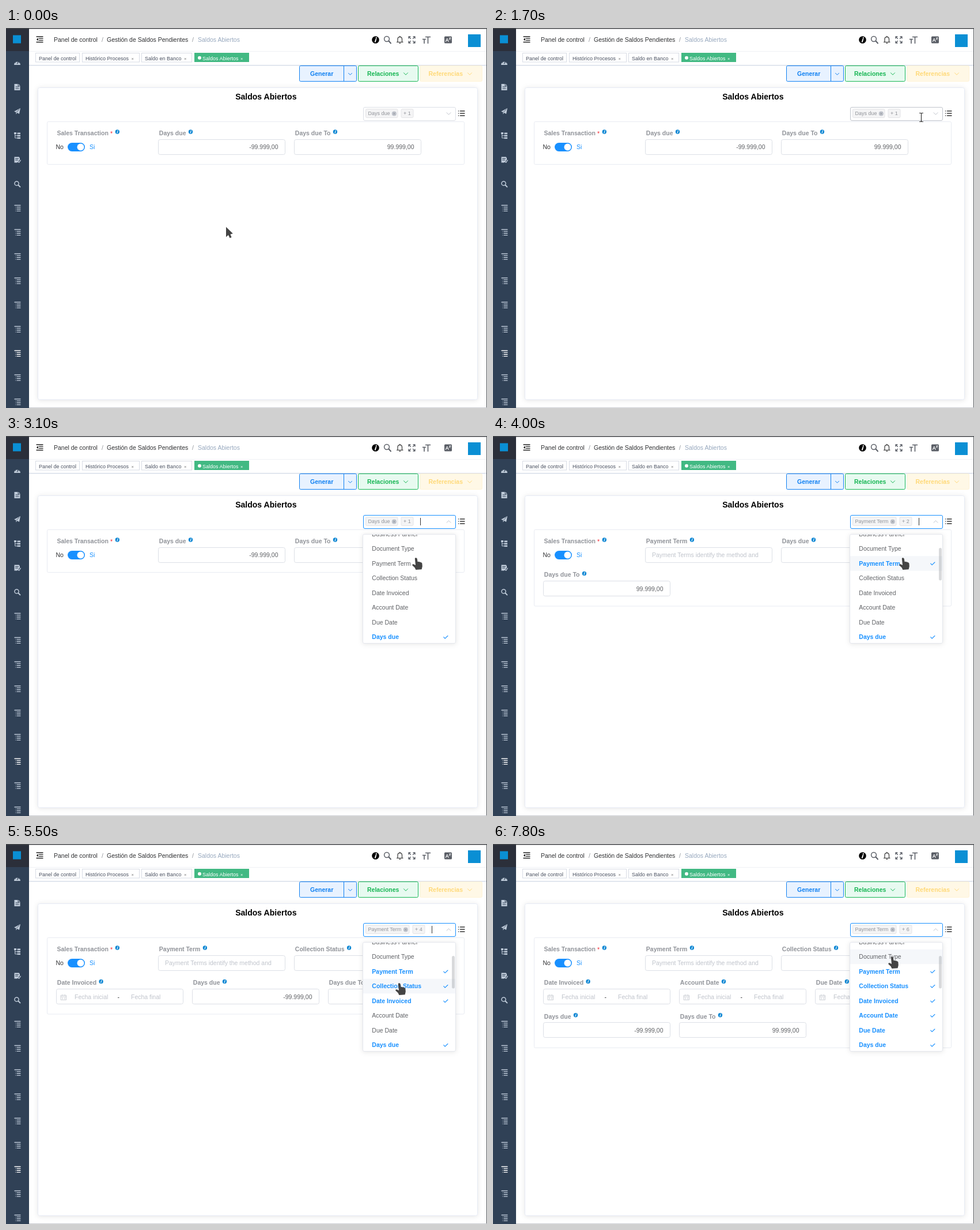
An HTML page for the animation above (8 s loop, 835 by 659 pixels).

```html
<!DOCTYPE html>
<html lang="es">
<head>
<meta charset="utf-8">
<title>Saldos Abiertos</title>
<style>
  html, body { margin: 0; width: 100%; height: 100%; overflow: hidden; background: #fff; }
  svg { display: block; width: 835px; height: 659px; font: 10.5px "Liberation Sans", Arial, sans-serif; }
  .b { font-weight: 700; }
  .s { font-size: 9px; }
  .line { fill: none; stroke-linecap: round; stroke-linejoin: round; }
  .card { filter: drop-shadow(0 1.5px 4px rgba(0,0,0,.1)); }
</style>
</head>
<body>
<svg viewBox="0 0 835 659">
  <defs>
    <clipPath id="list"><rect x="620" y="171" width="160" height="188.5"/></clipPath>
  </defs>
  <g id="page"></g>
  <g id="live"></g>
</svg>
<script>
const LOOP = 8000, STEP = 100;
const BLUE = '#1890ff', GREY = '#909399', PALE = '#c0c4cc', TEXT = '#606266', EDGE = '#dcdfe6';

const rect = (x, y, w, h, fill, stroke = 'none', r = 0, extra = '') =>
  `<rect x="${x}" y="${y}" width="${w}" height="${h}" fill="${fill}" stroke="${stroke}" rx="${r}" ${extra}/>`;
const text = (x, y, str, fill, cls = '', extra = '') =>
  `<text x="${x}" y="${y}" fill="${fill}" class="${cls}" ${extra}>${str}</text>`;
const line = (d, stroke, w = 1) => `<path class="line" d="${d}" stroke="${stroke}" stroke-width="${w}"/>`;
const shape = (d, fill, extra = '') => `<path d="${d}" fill="${fill}" ${extra}/>`;
const dot = (x, y, r, fill) => `<circle cx="${x}" cy="${y}" r="${r}" fill="${fill}"/>`;
const at = (x, y, body) => `<g transform="translate(${x} ${y})">${body}</g>`;
const chevron = (x, y, color, dir = 1, w = 3.5) =>
  line(`M${x - w} ${y - dir * w / 2}L${x} ${y + dir * w / 2}L${x + w} ${y - dir * w / 2}`, color);
const info = (x, y, r = 3.7, fill = '#1088d4') => dot(x, y, r, fill) +
  at(x, y, `<g transform="scale(${r / 6})">${line('M.8 -1L-.6 3.2', '#fff', 1.8)}${dot(1.2, -3.2, 1.1, '#fff')}</g>`);

const pen = document.createElement('canvas').getContext('2d');
function measure(str, font) {
  pen.font = `${font} "Liberation Sans", Arial, sans-serif`;
  return pen.measureText(str).width;
}

/* ---------- fixed page ---------- */

function sidebar() {
  const c = '#bfcbd9';
  const tree = color => line('M-5 -5H5M-1 -1.8H5M-1 1.5H5M-1 4.8H5', color, 1.3) +
    line('M-3.3 -1.8h.1M-3.3 1.5h.1M-3.3 4.8h.1', color, 1);
  const icons = [
    shape('M-5.5 3.5A5.5 5.5 0 1 1 5.5 3.5Z', c) + line('M0 1.5L1.5 -2M-3 0h.1M3 0h.1M-2 -2.5h.1', '#304156', 1.2),
    shape('M-5 -5.5H2L5 -2.5V5.5H-5Z', c) + line('M-2.5 -.5H2.5M-2.5 2.5H2.5M1.5 -5V-2H4.5', '#304156'),
    shape('M5.5 -5.5L3.5 4.5L-.2 2.5L-2 5.2L-2.2 1.4L-5.5 .2Z', c) + line('M-1.5 1.8L3.5 -3.5', '#304156', .8),
    rect(-5.5, -5.5, 4, 3, c) + rect(0, -5, 5.5, 2.6, c) + rect(0, -1, 5.5, 2.6, c) + rect(0, 3, 5.5, 2.6, c) +
      line('M-3.8 -3V4.3H0M-3.8 .3H0', c),
    shape('M-5 -5H3L4.5 -3V0L0 5H-5Z', c) + line('M-3 -2H2M-3 .5H1', '#304156') + line('M1.5 3L3 4.8L5.8 .8', c, 1.3),
    `<circle cx="-1" cy="-1" r="3.6" fill="none" stroke="${c}" stroke-width="1.5"/>` + line('M2 2L5 5', c, 1.8)
  ];
  let out = rect(0, 0, 40, 659, '#304156') + rect(0, 0, 40, 40, '#2b2f3a') + rect(12, 12.5, 14, 14, '#0a8fd4');
  for (let i = 0; i < 15; i++)
    out += at(19.5, 60.5 + 42 * i, icons[i] || at(.5, 0, tree(i === 12 ? '#fff' : c)));
  return out;
}

function navbar() {
  const k = '#5a5e66';
  const corner = (sx, sy) => line(`M${2 * sx} ${2 * sy}L${5 * sx} ${5 * sy}M${2.5 * sx} ${5.5 * sy}H${5.5 * sx}V${2.5 * sy}`, k, 1.3);
  return line('M53 15H64M57.5 18.2H64M57.5 21.4H64M53 24.5H64', '#222', 1.3) + shape('M56 17.2V22.3L52.8 19.8Z', '#222') +
    text(83, 24, 'Panel de control', '#303133') + text(166, 24, '/', GREY) +
    text(175, 24, 'Gestión de Saldos Pendientes', '#303133') + text(323, 24, '/', GREY) +
    text(333, 24, 'Saldos Abiertos', '#97a8be') +
    info(641.5, 20.5, 6.3, '#000') +
    `<circle cx="661" cy="19" r="4.4" fill="none" stroke="${k}" stroke-width="1.5"/>` + line('M664.5 22.5L668 26.5', k, 1.9) +
    line('M678.5 24.5H689M680 24V19.5Q680 15.5 683.8 15.3Q687.5 15.5 687.5 19.5V24M683.8 15V14M682.8 26.3H684.8', '#333', 1.2) +
    at(704.5, 20.5, corner(1, 1) + corner(1, -1) + corner(-1, 1) + corner(-1, -1)) +
    line('M728.5 15.5H736.5M732.5 15.5V26.5M723.5 19.5H728.5M726 19.5V26.5', k, 1.6) +
    rect(761, 14.5, 13, 12, k, 'none', 1.5) + text(762.5, 24, 'A', '#fff', 'b', 'font-size="9"') +
    line('M769.5 17.5H772.5M771 16.5V18L769.5 20.5M770 19L772 20.5', '#fff', .8) +
    rect(802, 11, 22, 22, '#0a8fd4') +
    rect(40, 40, 795, 1, '#eef0f4') + rect(40, 64, 795, 1.4, '#d5dbe8');
}

function tabs() {
  const tab = (x, w, name, close) => rect(x + .5, 43.5, w - 1, 15.5, '#fff', '#d8dce5') +
    text(x + 6, 55.5, name, '#495060', 's') + (close ? text(close, 56, '×', '#777', '', 'font-size="7.5"') : '');
  return tab(51, 77, 'Panel de control') + tab(132, 100, 'Histórico Procesos', 217.5) +
    tab(235, 88, 'Saldo en Banco', 309) +
    rect(327, 43, 95, 16, '#42b983') + dot(336, 51.8, 3, '#fff') +
    text(341, 55.5, 'Saldos Abiertos', '#fff', 's') + text(407, 56, '×', '#fff', '', 'font-size="7.5"');
}

function buttons() {
  const blue = '#1080f2', green = '#16b653', amber = '#ffd978';
  return rect(509.5, 65.5, 99, 27, '#e8f2ff', blue, 2) + line('M586.5 66V92', blue) +
    text(528, 83, 'Generar', blue, 'b') + chevron(597.5, 79.8, blue, 1, 3) +
    rect(611.5, 65.5, 104, 27, '#e7faf0', green, 2) + text(627, 83, 'Relaciones', green, 'b') + chevron(694, 79.5, green) +
    rect(718.5, 65.5, 108, 27, '#fff8e6', '#fff3d6', 2) + text(733.5, 83, 'Referencias', amber, 'b') + chevron(805, 79.5, amber);
}

function card() {
  return rect(55.5, 103.5, 763, 541, '#fff', '#e6ebf5', 3, 'class="card"') +
    text(451.3, 124, 'Saldos Abiertos', '#000', 'b', 'text-anchor="middle" style="font-size:14.04px"') +
    line('M788.5 144H796M788.5 148H796M788.5 152H796M785.5 144h.2M785.5 148h.2M785.5 152h.2', '#333', 1.4);
}

document.getElementById('page').innerHTML = sidebar() + navbar() + tabs() + buttons() + card() +
  rect(0, 0, 835, 1.5, '#45474b') + rect(834, 0, 1, 659, '#55585c') + rect(40, 658, 795, 1, '#c9ccd1');

/* ---------- timeline ---------- */

const POINTER = [
  [0, 382, 345], [500, 375, 343], [600, 350, 336], [700, 315, 325], [800, 291, 305], [900, 330, 280],
  [1000, 420, 250], [1100, 540, 220], [1200, 660, 195], [1300, 736, 176],
  [1400, 746, 159], [1500, 745, 152], [1600, 744, 154], [1700, 743, 155],
  [3100, 712, 211], [4100, 701, 278], [4800, 697, 268], [4900, 689, 253], [5000, 683, 241],
  [5600, 678, 262], [5700, 670, 290], [5800, 666, 305], [6400, 668, 326], [6600, 669, 331],
  [7300, 680, 262], [7400, 693, 195]
];
const PICKS = [[4000, 'Payment Term'], [4600, 'Date Invoiced'], [5500, 'Collection Status'],
  [6300, 'Account Date'], [7200, 'Due Date']];
const CARET = [[2600, 3200], [4000, 4400], [4600, 5300], [5500, 6000], [6300, 6900], [7200, 7800]];
const OPTIONS = ['Document Type', 'Payment Term', 'Collection Status', 'Date Invoiced', 'Account Date', 'Due Date', 'Days due'];
const FIELDS = [...OPTIONS.slice(1), 'Days due To'];
const SLOTS = [[264, 0], [500, 0], [87, 1], [323, 1], [559, 1], [87, 2], [323, 2]];
const OPEN = 2600, HAND = 3100, PITCH = 25.5;

/* ---------- moving parts ---------- */

function label(x, y, name) {
  return text(x, y, name, GREY, 'b') + info(x + measure(name, 'bold 10.5px') + 8, y - 6);
}

function field(name, [x, row]) {
  const y = 193.5 + 58.4 * row, base = y + 16.6;
  let out = label(x + 1.8, y - 7.5, name) + rect(x + .5, Math.round(y) - .5, 220, 26, '#fff', EDGE, 3);
  if (name.startsWith('Days'))
    out += text(x + 208.5, base, name === 'Days due' ? '-99.999,00' : '99.999,00', TEXT, '', 'text-anchor="end"');
  else if (name === 'Payment Term')
    out += text(x + 12, base, 'Payment Terms identify the method and', PALE);
  else if (name.includes('Date'))
    out += at(x + 13, y + 14, line('M-4.5 -3.5H4.5V4.5H-4.5ZM-4.5 -1H4.5M-2 -4.5V-3M2 -4.5V-3M-2.5 1h1M1.5 1h1M-2.5 2.8h1M1.5 2.8h1', PALE, .8)) +
      text(x + 32, base, 'Fecha inicial', PALE) + text(x + 106.5, base, '-', '#303133') + text(x + 130, base, 'Fecha final', PALE);
  return out;
}

function form(chosen) {
  const shown = FIELDS.filter(f => chosen.has(f) || f === 'Days due To');
  const rows = SLOTS[shown.length - 1][1];
  return rect(71.5, 162.5, 724, 74 + 58.5 * rows, '#fff', '#e8ebf2', 2) +
    text(88.5, 186, 'Sales Transaction', GREY, 'b') + text(181, 187, '*', '#f5222d') + info(193.3, 180) +
    text(86.5, 210, 'No', '#303133') + rect(107, 199, 30, 15, BLUE, 'none', 7.5) + dot(129.5, 206.5, 6, '#fff') +
    text(145, 210, 'Si', BLUE) + shown.map((f, i) => field(f, SLOTS[i])).join('');
}

function select(t, chosen) {
  const open = t >= OPEN, first = FIELDS.find(f => chosen.has(f));
  const end = 628.5 + measure(first, '9px');
  const border = open ? BLUE : t >= 1400 ? PALE : EDGE;
  const tag = (x, w) => rect(x + .5, 140.5, w - 1, 15, '#f4f4f5', '#e4e4e7', 2);
  let out = rect(620.5, 137.5, 160, 23, '#fff', border, 2.5) + tag(624, end - 610) +
    text(628.5, 151, first, GREY, 's') + dot(end + 7.3, 148.5, 4, PALE) +
    line(`M${end + 6} 147.2l2.6 2.6m0 -2.6l-2.6 2.6`, GREY, .9) +
    tag(end + 19, 22) + text(end + 23.5, 151, `+ ${chosen.size}`, GREY, 's') + chevron(768.5, 148.5, PALE, open ? -1 : 1);
  if (CARET.some(([on, off]) => t >= on && t < off))
    out += rect(Math.round(end + 52), 142, 1, 13, '#303133');
  return out;
}

function dropdown(t, chosen, hover) {
  const grow = Math.min(1, (t - OPEN + STEP) / 300);
  const row = (name, i) => {
    const mid = 195.5 + PITCH * i, on = chosen.has(name);
    return (i === hover ? rect(620, mid - PITCH / 2, 160, PITCH, '#f5f7fa') : '') +
      text(635.3, mid + 3.5, name, on ? BLUE : TEXT, on ? 'b' : '') +
      (on ? line(`M759.8 ${mid + .2}l2.3 2.4l4.8 -4.6`, BLUE, 1.1) : '');
  };
  const thumb = Math.max(0, Math.min(1, (t - HAND) / 400));
  return `<g opacity="${grow}" transform="translate(0 ${165 * (1 - grow) * .3}) scale(1 ${1 - .3 * (1 - grow)})">` +
    rect(619.5, 170.5, 161, 189, '#fff', '#e4e7ed', 2.5, 'class="card"') +
    `<g clip-path="url(#list)">${row('Business Partner', -1)}${OPTIONS.map(row).join('')}</g>` +
    rect(774, 194, 5, 56.5, GREY, 'none', 2.5, `opacity="${.35 * thumb}"`) + '</g>';
}

function pointer(t, x, y) {
  const rim = 'stroke="#fff" stroke-opacity=".6" stroke-width=".8" stroke-linejoin="round" paint-order="stroke"';
  if (t >= HAND)
    return at(x, y, shape('M-2.2 1.5Q-1.8 -.2 0 .3Q1.6 .6 1.8 2.2L2.6 7.2Q4.2 6 5.4 7.4Q7 6.6 7.9 8.2Q10 7.8 10.4 10L10.8 15L9.6 20.2L-.6 21L-2.4 17.3L-6.7 13.2Q-7.2 11 -4.6 11.2L-1 13Z', '#444', rim));
  if (t >= 1500)
    return at(x + .5, y, line('M-3 -7.5H-1L0 -6.8L1 -7.5H3M0 -6.8V6.8M-3 7.5H-1L0 6.8L1 7.5H3', '#333', 1.2));
  return at(x, y, shape('M0 0V17.5L4 14L6.5 19.3L9.6 18L7.4 12.8L11.8 11.5Z', '#444', rim));
}

function draw(t) {
  const [, x, y] = POINTER.findLast(p => p[0] <= t);
  const chosen = new Set(['Days due', ...PICKS.filter(p => p[0] <= t).map(p => p[1])]);
  const hover = t > HAND ? Math.floor((y - 182.75) / PITCH) : null;
  document.getElementById('live').innerHTML = form(chosen) + select(t, chosen) +
    (t >= OPEN ? dropdown(t, chosen, hover) : '') + pointer(t, x, y);
}

const start = performance.now();
let last = -1;
function tick() {
  const t = Math.floor((performance.now() - start) % LOOP / STEP) * STEP;
  if (t !== last) draw(last = t);
  requestAnimationFrame(tick);
}
tick();
</script>
</body>
</html>
```
